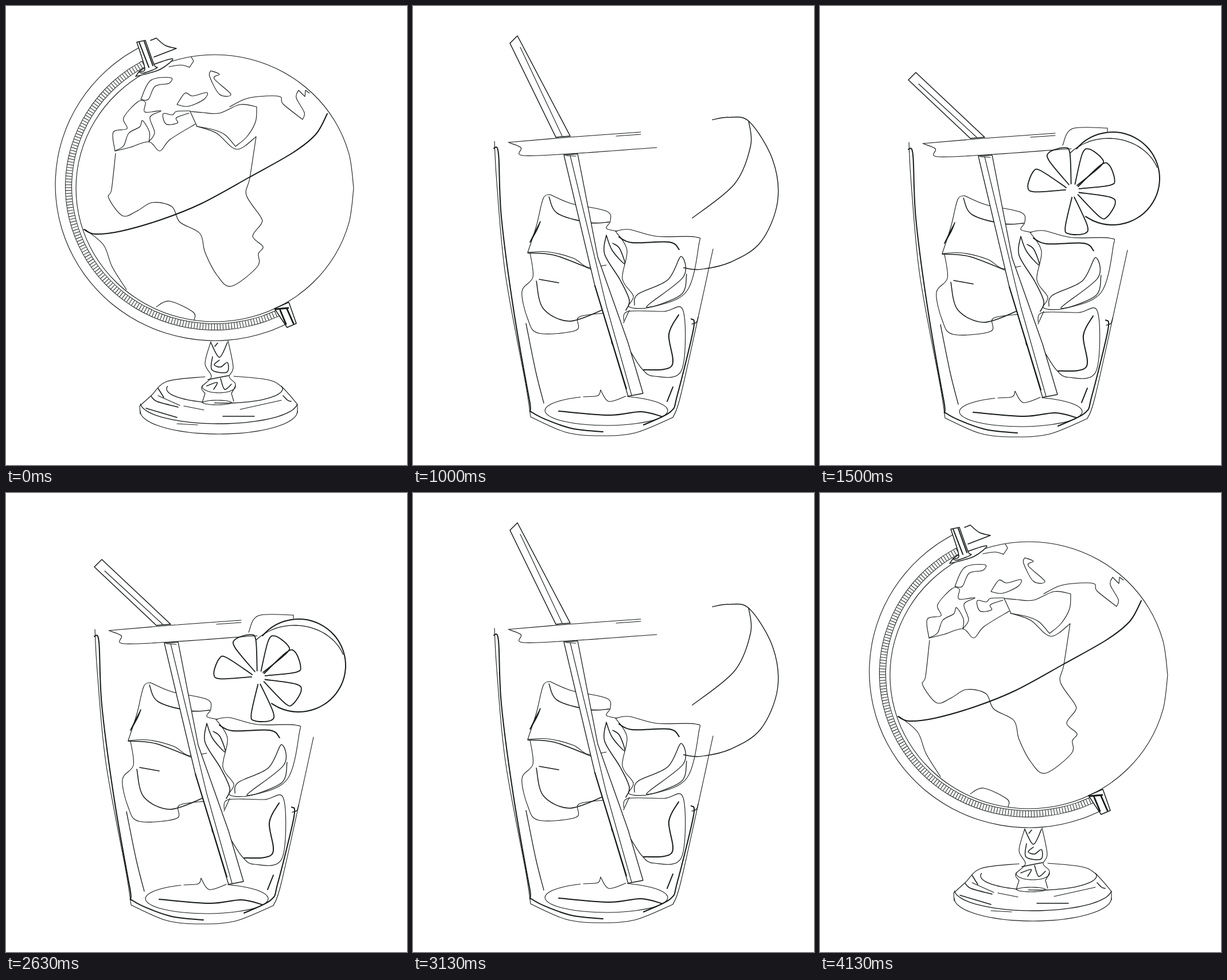
Write an HTML page that moves like this. It is 699 px wide and 801 px high and loops after 4330 ms.

```html
<!DOCTYPE html>
<html lang="en">
<head>
<meta charset="utf-8">
<title>Globe to glass</title>
<style>
html, body { margin: 0; width: 100%; height: 100%; overflow: hidden; background: #fff; }
svg { display: block; width: 100%; height: 100%; }
path { fill: none; stroke: currentColor; stroke-linecap: round; stroke-linejoin: round; }
g { color: #151a19; }
svg > g { visibility: hidden; animation: 4330ms step-end infinite; }
#globe { animation-name: globe; }
#split { animation-name: split; }
#blend { animation-name: blend; }
#glass { animation-name: glass; }
#straw { animation-name: straw; }
#lifted { animation-name: lifted; }
@keyframes globe { 0%, 95.381% { visibility: visible } 11.547% { visibility: hidden } }
@keyframes split { 0%, 23.095%, 95.381% { visibility: hidden } 11.547%, 83.834% { visibility: visible } }
@keyframes blend { 0%, 34.642%, 83.834% { visibility: hidden } 23.095%, 72.286% { visibility: visible } }
@keyframes glass { 0%, 72.286% { visibility: hidden } 34.642% { visibility: visible } }
@keyframes straw { 0%, 46.189%, 72.286% { visibility: hidden } 34.642%, 60.739% { visibility: visible } }
@keyframes lifted { 0%, 60.739% { visibility: hidden } 46.189% { visibility: visible } }
</style>
</head>
<body>
<svg viewBox="0 0 699 801">
  <g id="globe"></g><g id="split"></g><g id="blend"></g>
  <g id="glass"></g><g id="straw"></g><g id="lifted"></g>
</svg>
<script>
const thin = 1.1, medium = 1.5, bold = 2;
const solid = "fill:#fff";

// Smooth path through points; "!" marks a corner, "|" lifts the pen.
function curve(text) {
  return text.split("|").map(run => {
    const pts = run.trim().split(/\s+/).map(s => {
      const [x, y] = s.split(",").map(parseFloat);
      return { x, y, corner: s.endsWith("!") };
    });
    let d = `M${pts[0].x} ${pts[0].y}`;
    for (let i = 1; i < pts.length; i++) {
      const a = pts[i - 1], b = pts[i];
      const before = a.corner ? a : pts[i - 2] || a;
      const after = b.corner ? b : pts[i + 1] || b;
      d += `C${a.x + (b.x - before.x) / 6} ${a.y + (b.y - before.y) / 6} ` +
           `${b.x - (after.x - a.x) / 6} ${b.y - (after.y - a.y) / 6} ${b.x} ${b.y}`;
    }
    return d;
  }).join("");
}

const polar = (cx, cy, rx, ry, deg) => {
  const a = deg * Math.PI / 180;
  return `${cx + rx * Math.cos(a)},${cy + ry * Math.sin(a)}`;
};

function arc(cx, cy, rx, ry, from = 0, to = 360) {
  const steps = 24;
  return Array.from({ length: steps + 1 }, (_, i) =>
    polar(cx, cy, rx, ry, from + (to - from) * i / steps)).join(" ");
}

function addGroup(parent, transform) {
  const group = document.createElementNS("http://www.w3.org/2000/svg", "g");
  group.setAttribute("transform", transform);
  return parent.appendChild(group);
}

const penFor = group => (width, text, style = "") => {
  const path = document.createElementNS("http://www.w3.org/2000/svg", "path");
  path.setAttribute("d", curve(text));
  path.style.cssText = `stroke-width:${width};${style}`;
  group.append(path);
};
const pen = id => penFor(document.getElementById(id));

// Graduated band: dark edges, white core, rungs across.
function band(draw, width, gap, text) {
  const butt = "stroke-linecap:butt;";
  draw(width + 2, text, butt);
  draw(width, text, butt + "stroke:#fff");
  draw(width, text, butt + `stroke-dasharray:1 ${gap}`);
}

function drawGlobe(draw) {
  draw(thin, arc(364, 312, 278, 272, 63, 242));
  band(draw, 10, 4, arc(364, 315, 255, 245, 63, 241));
  draw(thin, arc(364, 318, 242, 233));
  draw(bold, "136,390 155,398 200,393 270,373 340,345 424,299 500,256 540,224 560,188");
  // Africa
  draw(thin, "191,257 184,320 179,335 203,366 228,358 255,343 289,350 303,377 338,397 347,430 368,470 393,489 438,455 440,432 448,420 430,402 445,380 444,368 419,330 425,300 436,228! 402,250 367,222 333,210! 321,184");
  draw(thin, "190,253 215,247 249,237 268,253 286,233 330,206");
  // Near East, Europe, Asia
  draw(thin, "321,184 343,186 372,187 408,172 437,176! 435,202 420,228 400,245! 382,225 362,216 332,210");
  draw(thin, "190,253 187,220 211,214 205,195 230,167 243,168 242,185 270,183 251,194 259,221 249,237! 250,220 238,200 233,211 214,222 205,244 190,253");
  draw(thin, "321,183 297,184 290,190 274,188 279,206 299,204 297,195 319,187");
  draw(thin, "235,163 252,130 287,125 284,135 260,140 248,163 235,163");
  draw(thin, "298,172 312,152 325,157 350,151 345,163 318,175 298,172 | 357,113 372,119 363,127 392,154 372,154 355,123 357,113");
  draw(thin, "284,106 305,103 320,107! 327,96! 323,89 | 390,176 415,163 440,158 477,158 483,171 517,198! 520,186 506,160 510,147! 521,158! 522,147! 529,152");
  draw(thin, "138,390 170,417 185,455 210,495 | 262,525 285,515 326,534 328,548");
  // Pivots
  draw(medium, "252,60! 262,56! 278,69 297,74! 258,89", solid);
  draw(medium, "226,123 240,109 290,92 268,111 226,123", solid);
  draw(medium, "228,63! 243,60! 258,102 263,108 240,117 232,114 242,109 228,63!", solid);
  draw(bold, "232,63 249,107 | 241,62 256,104");
  draw(medium, "468,528! 493,517! 506,554! 490,561! 468,528!", solid);
  draw(2.8, "478,531 488,555 | 490,529 501,554 | 470,529 492,527");
  // Stem
  draw(thin, "357,586 347,624 358,647 341,665 347,676! 342,692 | 387,584 396,630 389,647 400,660 393,676! 397,690");
  draw(thin, arc(371, 664, 29, 11, -10, 190) + "|" + arc(368, 692, 25, 4));
  draw(medium, "357,587 372,613 386,587 | 364,594 369,588 | 360,612 359,635 385,639 386,622 374,630 363,626 372,618 | 350,663 368,657 362,669 | 352,652 388,645 | 374,650 381,669 393,660");
  // Base
  draw(thin, "347,647 281,655 253,680 233,698! 234,712! | 508,710! 508,695! 480,664 455,652 397,646");
  draw(thin, arc(371, 707, 137, 40, 0, 180));
  draw(1.3, arc(371, 692, 137, 37, 5, 176) + "|" + arc(381, 668, 101, 25, -10, 100) + "|" + arc(381, 668, 101, 25, 112, 190));
  draw(medium, "253,681 263,690 300,700 | 265,667 275,683 | 244,702 298,718 | 483,680 491,688 497,690 | 378,716 433,716");
  draw(thin, "265,680 303,697 | 310,698 345,705 | 408,704 480,688 | 298,729 334,731");
}

const hemisphere = "460,155 500,149 552,160 610,255 622,360 580,460 505,510 430,528 388,524";

function drawSplit(draw) {
  draw(thin, "213,123 160,198 112,310 105,425 150,508 260,572 400,603 473,612! 468,588!");
  band(draw, 4.5, 3, "225,140 168,227 127,332 124,430 167,499 272,555 402,585 468,592");
  draw(thin, "250,162 228,155 170,225 132,330 131,386! 152,390 163,409 195,407 220,399");
  draw(thin, "137,397 150,398 190,440 215,490 240,525! 195,492 150,430 137,397 | 258,530 280,526 330,564 270,543 258,530");
  draw(thin, hemisphere + "| 211,412 255,463 312,500");
  draw(bold, "550,158 555,220 515,315 410,400 | 211,402 235,427 283,436");
  // Africa
  draw(thin, "214,310 217,330 205,380 220,400 275,407 290,445 317,480 315,500 338,562 350,567 385,540 403,500 388,465 410,400 411,347! 375,322 347,285 343,247 315,270 300,311 278,325 214,310");
  draw(thin, "218,396 232,365 285,363 321,320 324,294 336,291 | 441,127 438,150 422,158 430,200 | 410,222 344,298", "stroke-dasharray:14 4 3 4");
  // Europe and Asia
  draw(thin, "219,307 237,265 226,240 233,221! 235,240 264,168 290,145 307,146 283,180 253,190");
  draw(1.3, "221,307 262,305 272,266 285,242 292,263 308,270 298,294 292,286 301,281 296,263 | 304,268 292,236 327,250 338,251 329,240 344,223 354,247 345,258");
  draw(1.3, "370,135 383,143 382,188 372,210 362,212 355,180 370,135");
  draw(thin, "252,128 289,122 297,137 305,125 308,137 328,110 335,119 340,103 410,101 442,124 437,147");
  draw(thin, "376,98 437,122 470,178 485,200 498,265! 490,266! 455,222 410,203 415,220 443,265 418,334 409,328 400,280 370,240 358,229 364,256");
  draw(medium, "353,291 364,313 379,305 367,280");
  // Pivots
  draw(medium, "317,75 370,68 387,70! 340,98 245,115! 246,125! 350,102 388,82! 388,70!");
  draw(medium, "188,89! 203,80! 256,156! 247,163! 188,89!", solid);
  draw(medium, "195,88 241,149 | 206,86 249,148");
  draw(medium, "444,530! 461,577 482,576! 466,525 | 455,529 470,574");
  // Stem
  draw(thin, "352,597 331,650 338,668 310,700 335,714 375,719 426,697 399,672 406,630 383,597 | 355,548 357,573 | 376,543 378,576");
  draw(medium, "352,600 367,604 374,598 | 361,605 344,635 353,655 386,667 | 384,601 388,641 | 337,665 374,673 376,692 392,700 383,704");
  draw(medium, arc(375, 715, 29, 8, 0, 180) + "|" + arc(367, 637, 3, 5));
  draw(thin, "337,683 367,688", "stroke-dasharray:15 4 3 4");
  // Base
  draw(medium, arc(364, 709, 139, 38, -68, 255));
  draw(medium, "252,697 255,717 340,733 386,736 386,741 | 474,703 488,704 466,724 | 468,725 438,729");
}

function drawWalls(draw) {
  draw(thin, "155,238 159,310 174,470 209,660 218,719! 280,746 340,752 400,747 466,720! 480,680 520,500 536,426");
  draw(bold, "154,250 162,260 167,370 188,530 216,690 222,712 285,738 344,745 | 498,548 502,565 474,680 462,710 415,733 | 466,667 456,692");
  draw(1.3, "210,556 227,640 241,695 | 499,557 507,554 510,545");
  draw(thin, "410,222 285,231 179,240! 201,249 205,263 300,259 438,249 | 367,229 410,226");
  draw(thin, arc(350, 708, 107, 26, -70, 245) + "| 340,672 335,682 310,684 | 340,672 354,692 384,683");
  draw(bold, "267,709 355,716 410,710 446,718");
}

function drawSlice(draw) {
  draw(thin, "423,243 440,214 501,213! 501,219");
  draw(bold, arc(510, 301, 82, 81, -140, 125));
  draw(1.3, arc(503, 308, 90, 77, -138, -20));
  const [cx, cy] = [440, 322];
  for (const angle of [195, 249, 302, 335, 27, 84]) {
    const at = (r, turn) => polar(cx, cy, r, r, angle + turn);
    draw(1.8, [at(12, -10), at(66, -17), at(78, -10), at(76, 10), at(66, 17), at(12, 10)].join(" "));
  }
}

function drawIce(draw) {
  draw(thin, "252,331 240,338 228,386 213,432! 248,431 292,442 318,458 350,454 | 252,331 290,347 350,360 357,377 350,390 369,395");
  draw(medium, "250,335 265,364 320,380 355,379 | 213,433 260,437 325,462 | 235,378 229,393 217,414 235,378");
  draw(thin, "217,433 222,475 203,500 213,548 232,573 297,568 302,545 345,538");
  draw(medium, "228,482 240,530 285,552 342,533 | 233,479 267,485 | 350,402 347,435 374,480 390,515 384,533 | 350,402 360,428 382,452 373,425 361,416");
  draw(thin, "366,395 390,392 438,404 505,405 511,420 490,500 430,527 390,527 397,508 378,478 386,428 366,395");
  draw(bold, "372,405 395,415 460,414 477,427");
  draw(1.3, "399,524 405,505 457,480 480,439 484,475 420,527 480,506 490,470");
  draw(thin, "380,551 388,535 450,535 484,534 481,638 433,648 412,635 391,603 | 390,533 380,555 | 358,569 360,592 373,594");
  draw(bold, "476,541 459,575 464,630 415,637");
}

// Straw with its upper arm ending at the given tip.
function drawStraw(draw, x, y) {
  draw(1.3, "276,262! 300,260! 335,440! 388,590! 414,678! 388,683! 330,490! 276,262!", solid);
  draw(thin, "287,263! 350,525! 394,681");
  draw(bold, "330,490 385,670");
  draw(medium, `${x},${y + 13}! ${x + 13},${y}! 287,229! 262,231! ${x},${y + 13}!`, solid);
  draw(thin, `${x + 18},${y + 20} 273,229 | 280,263 297,264`);
}

// Halfway state: the glass forms while half the sphere becomes the slice.
function drawBlend(root) {
  const cup = penFor(addGroup(root, "translate(-13 -2)"));
  drawWalls(cup);
  drawIce(cup);
  drawStraw(cup, 182, 54);
  const half = penFor(addGroup(root, "translate(200 90) scale(.7)"));
  half(bold, hemisphere + "| 550,158 555,220 515,315 410,400");
}

drawGlobe(pen("globe"));
drawSplit(pen("split"));
drawBlend(document.getElementById("blend"));
drawWalls(pen("glass"));
drawSlice(pen("glass"));
drawIce(pen("glass"));
drawStraw(pen("straw"), 154, 116);
drawStraw(pen("lifted"), 134, 84);
</script>
</body>
</html>
```
